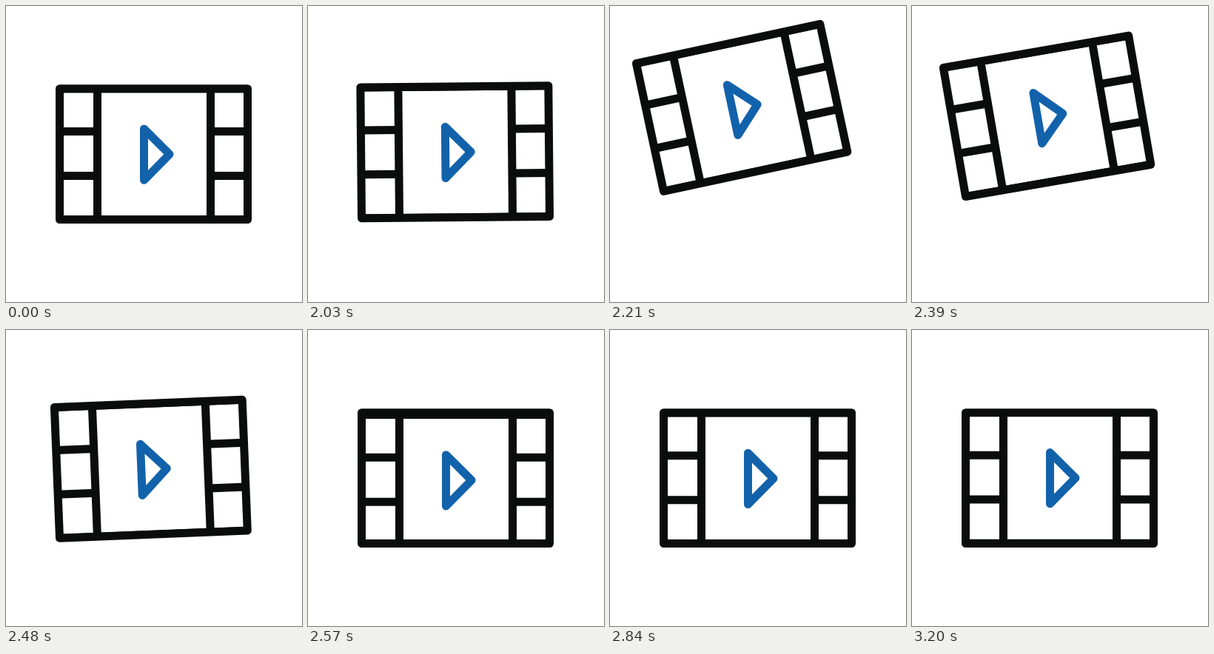
An HTML page with a canvas for the animation above (3.29 s loop, 400 by 400 pixels).

```html
<!DOCTYPE html>
<html lang="en">
<head>
<meta charset="utf-8">
<title>Film strip</title>
<style>
  html, body { margin: 0; width: 100%; height: 100%; overflow: hidden; background: #fff; }
  canvas { display: block; width: 100vmin; height: 100vmin; }
</style>
</head>
<body>
<canvas id="stage" width="400" height="400"></canvas>
<script>
const ctx = document.getElementById('stage').getContext('2d');

const LOOP = 3290, STEP = 30;
const SWING_START = 2000, SWING_HALF = 270, LIFT = 40, TILT = 12.7;
const SCROLL_START = 2543.5, SCROLL_TIME = 296;
const LEFT = 72.5, RIGHT = 326.5, TOP = 111.7, BOTTOM = 288.5;
const PITCH = 177;
const INK = '#0b0c0c', BLUE = '#1262ab';

const clamp = x => Math.min(1, Math.max(0, x));
const bezier = (a, b, v) => 3 * v * (1 - v) ** 2 * a + 3 * v * v * (1 - v) * b + v ** 3;

function ease(x) {
  let lo = 0, hi = 1;
  for (let i = 0; i < 24; i++) {
    const mid = (lo + hi) / 2;
    if (bezier(0.333, 0.36, mid) < x) lo = mid; else hi = mid;
  }
  return bezier(0, 1, lo);
}

// Up and back down along the same curve.
function swing(t) {
  return ease(clamp(1 - Math.abs(t - SWING_START - SWING_HALF) / SWING_HALF));
}

// One pitch of travel, then a damped bounce.
function scroll(t) {
  const v = (t - SCROLL_START) / SCROLL_TIME;
  if (v <= 0) return 0;
  if (v < 1) return PITCH * (2 * v * v - v ** 3);
  const s = (t - SCROLL_START - SCROLL_TIME) / 1000;
  return 29.5 * Math.sin(5 * Math.PI * s) * Math.exp(-10 * s);
}

function path(color, points, closed) {
  ctx.strokeStyle = color;
  ctx.beginPath();
  points.forEach(([x, y]) => ctx.lineTo(x, y));
  if (closed) ctx.closePath();
  ctx.stroke();
}

const bar = (x1, y1, x2, y2) => path(INK, [[x1, y1], [x2, y2]]);

function drawCell(y) {
  path(BLUE, [[186.5, y + 54.3], [221, y + 88.6], [186.5, y + 123.6]], true);
  bar(LEFT, y, RIGHT, y);
  for (const tick of [57.9, 117.8]) {
    bar(LEFT, y + tick, 123.5, y + tick);
    bar(276.5, y + tick, RIGHT, y + tick);
  }
}

function draw(t) {
  const amount = swing(t), offset = scroll(t);
  ctx.fillStyle = '#fff';
  ctx.fillRect(0, 0, 400, 400);
  ctx.lineWidth = 11;
  ctx.lineJoin = 'round';

  ctx.save();
  ctx.translate(LEFT, BOTTOM - LIFT * amount);
  ctx.rotate(-TILT * amount * Math.PI / 180);
  ctx.translate(-LEFT, -BOTTOM);

  ctx.save();
  ctx.beginPath();
  ctx.rect(LEFT, TOP, RIGHT - LEFT, BOTTOM - TOP);
  ctx.clip();
  for (const i of [-1, 0, 1]) drawCell(TOP + offset + i * PITCH);
  ctx.restore();

  bar(123.5, TOP, 123.5, BOTTOM);
  bar(276.5, TOP, 276.5, BOTTOM);
  path(INK, [[LEFT, TOP], [RIGHT, TOP], [RIGHT, BOTTOM], [LEFT, BOTTOM]], true);
  ctx.restore();
}

const start = performance.now();
function tick() {
  const t = (performance.now() - start) % LOOP;
  const steps = Math.min(40, Math.max(0, Math.floor((t - SWING_START) / STEP)));
  draw(SWING_START + steps * STEP);
  requestAnimationFrame(tick);
}
tick();
</script>
</body>
</html>
```
